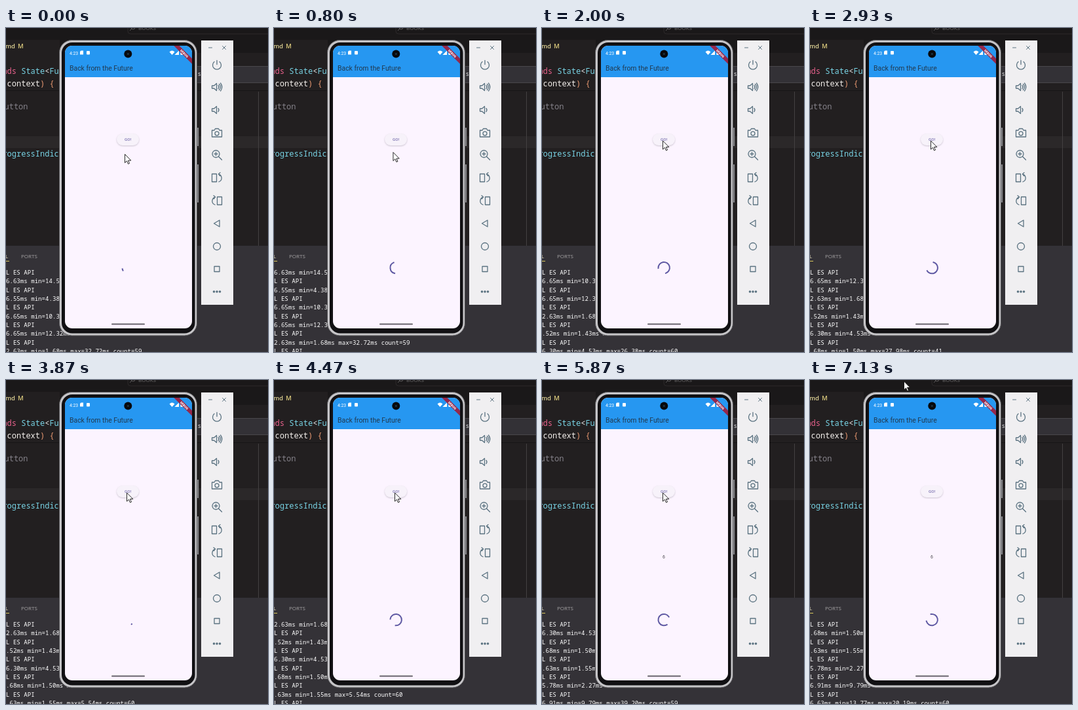
These frames come from a looping animation (400 px wide and 494 px high, 7.2 s). An HTML page:

```html
<!DOCTYPE html>
<html lang="en">
<head>
<meta charset="utf-8">
<title>Future demo</title>
<style>
  html, body { margin: 0; width: 100%; height: 100%; overflow: hidden; background: #221f20; }
  svg { position: absolute; left: 0; top: 0; display: block; }
  text { white-space: pre; }
  .mono { font-family: "Noto Sans Mono", "DejaVu Sans Mono", monospace; }
  .code { font-size: 12px; }
  .log { font-size: 9.1px; font-weight: 500; fill: #fff; }
  .ui { font-family: "Open Sans", "Noto Sans", sans-serif; }
  .app { font-family: Roboto, sans-serif; }
  .tools { fill: none; stroke: #5a7280; stroke-width: 1.3; stroke-linecap: round; stroke-linejoin: round; }
  .tools .solid { fill: #5a7280; stroke: none; }
</style>
</head>
<body>
<svg width="400" height="494" viewBox="0 0 400 494">
  <defs>
    <clipPath id="screen"><rect x="90" y="27" width="194" height="431" rx="11"/></clipPath>
    <clipPath id="console"><rect y="364" width="400" height="130"/></clipPath>
    <filter id="soft" x="-20%" y="-40%" width="140%" height="180%"><feGaussianBlur stdDeviation=".8"/></filter>
  </defs>

  <!-- editor -->
  <rect width="400" height="494" fill="#221f20"/>
  <rect width="400" height="38" fill="#1a1819"/>
  <path d="M186 0V5q0 4 4 4H400" fill="none" stroke="#2c292a"/>
  <rect y="18" width="82" height="20" fill="#221f20"/>
  <g fill="none" stroke="#5c595a"><circle cx="194" cy="-1" r="3"/><path d="M192 1l-3 3"/></g>
  <text class="ui" x="202" y="3" font-size="8" fill="#6b696a">BOOKS</text>
  <text class="ui" x="-1" y="30.500" font-size="9.500" font-weight="600" fill="#dfd395">md <tspan x="18" fill="#d8c77a">M</tspan></text>
  <path d="M0 95.500H82M290 95.500H400" stroke="#171516"/>
  <rect y="165" width="400" height="18" fill="#2b2829"/>
  <path d="M385.500 97V332" stroke="#444142"/>
  <rect x="280" y="58.500" width="130" height="25" fill="#333136" stroke="#4a474b"/>
  <g class="mono code">
    <text x="1.600" y="70.300" fill="#e8618c" text-anchor="start"><tspan x="-5.600">nds </tspan><tspan fill="#78d3e4">State</tspan><tspan fill="#eee">&lt;</tspan><tspan fill="#78d3e4">Fu</tspan></text>
    <text x="1.600" y="89.300" fill="#f4f0ec">context<tspan fill="#eb9a72">) {</tspan></text>
    <text x="-2.500" y="124" fill="#85828a">utton</text>
    <text x="-5.600" y="196" fill="#78d3e4">rogressIndic</text>
    <text x="287" y="73" font-size="9" fill="#ddd">ns</text>
  </g>

  <!-- terminal -->
  <rect y="332" width="400" height="162" fill="#343237"/>
  <text class="ui" x="-1" y="351" font-size="8" fill="#e6e1c0">L</text>
  <text class="ui" x="23" y="351" font-size="8" fill="#a5a2a4">PORTS</text>
  <path d="M0 355.500H5" stroke="#d8c65c"/>
  <g id="log" class="mono log" clip-path="url(#console)"></g>

  <!-- phone -->
  <path d="M291 152h3v28h-3zM291 208h3v58h-3z" fill="#8f8f93"/>
  <rect x="81.500" y="18.500" width="210" height="450.500" rx="19" fill="#c6c5c8" stroke="#59585b"/>
  <rect x="85" y="22" width="203.500" height="443.500" rx="16" fill="#111013"/>
  <g clip-path="url(#screen)">
    <rect x="90" y="27" width="194" height="431" fill="#fcf4ff"/>
    <rect x="90" y="27" width="194" height="48" fill="#2697f1"/>
    <g fill="#fff">
      <text class="app" x="97" y="40.500" font-size="6.800">4:23</text>
      <path d="M113 36l1.500-1.500h3.500v6h-5z"/>
      <rect x="123" y="35" width="5" height="5.500" rx="1"/>
      <path d="M249.500 36.500q4-4 8 0l-4 4.500zM264 34.500v6.500h-6.500zM266.500 35h1v-1h2v1h1v6h-4z"/>
    </g>
    <path d="M258 24.600l28.400 28.400" stroke="#95284c" stroke-width="5.900"/>
    <text class="app" transform="translate(270.900 40.100) rotate(45)" text-anchor="middle" font-size="4.800" font-weight="900" fill="#fff">DEBUG</text>
    <text class="app" x="97" y="65.200" font-size="10.400" fill="#223a50">Back from the Future</text>
    <rect x="169" y="162" width="34" height="18" rx="9" fill="#8b8391" opacity=".42" filter="url(#soft)"/>
    <rect x="169" y="161" width="34" height="18" rx="9" fill="#f7f2fa"/>
    <text class="app" x="186" y="172.100" text-anchor="middle" font-size="6.200" font-weight="500" fill="#7a70b0">GO!</text>
    <text id="result" class="app" x="186" y="271.700" text-anchor="middle" font-size="6.800" fill="#4a464f">6</text>
    <path id="spin" fill="none" stroke="#5f59a3" stroke-width="2" stroke-linecap="square"/>
    <rect x="161" y="450.500" width="51" height="2" rx="1" fill="#67636a"/>
  </g>
  <circle cx="186.300" cy="39.500" r="6" fill="#08090c"/>
  <circle cx="186.300" cy="39.500" r="1.600" fill="#1d3342"/>

  <!-- emulator tools -->
  <rect x="298" y="19" width="49" height="403" fill="#f0eff1"/>
  <g class="tools">
    <path d="M309.500 30h5M330.500 27.500l5 5m0-5l-5 5" stroke-width="1"/>
    <path d="M322 49.500v6M318 51.500a6.500 6.500 0 1 0 8 0"/>
    <path id="speaker" d="M314.500 88h3l4-3.500v11l-4-3.500h-3zM324 87.500q2 2.500 0 5"/>
    <path d="M325.500 85.500q4 4.500 0 9M327.500 84q4.500 6 0 12"/>
    <use href="#speaker" y="35"/>
    <path d="M314.500 156h3.500l1.500-2.500h5l1.500 2.500h3.500v10h-15z"/><circle cx="322" cy="160.800" r="3"/>
    <circle cx="320.500" cy="192" r="5.500"/><path d="M324.500 196l5 5M318 192h5M320.500 189.500v5"/>
    <g id="rotate">
      <path d="M314.500 222.500h7v12h-7zM325 234.500q5-2 4-7-1-4-4.500-4.500M327 220.500l-2.500 2 2 3"/>
    </g>
    <use href="#rotate" transform="translate(644 35) scale(-1 1)"/>
    <path d="M326 293v10l-8.500-5zM318 363.500h8v8h-8z"/>
    <circle cx="322" cy="333" r="5.500"/>
    <g class="solid"><circle cx="317.500" cy="402" r="1.800"/><circle cx="322" cy="402" r="1.800"/><circle cx="326.500" cy="402" r="1.800"/></g>
  </g>

  <path id="cursor" d="M0 0V13l3-2.800 2 4.600 2-.9-2-4.400h4.300z" fill="#fff" stroke="#111" stroke-width=".9"/>
</svg>
<script>
const LOOP = 7200, STEP = 200 / 3;
const $ = id => document.getElementById(id);
const log = $('log'), spin = $('spin'), cursor = $('cursor'), result = $('result');

const stats = [
  '6.63ms min=14.51ms max=20.40ms count=60',
  '6.55ms min=4.38ms max=29.12ms count=60',
  '6.65ms min=10.34ms max=22.75ms count=60',
  '6.65ms min=12.32ms max=20.22ms count=61',
  '2.63ms min=1.68ms max=32.72ms count=59',
  '.52ms min=1.43ms max=4.50ms count=60',
  '6.30ms min=4.53ms max=26.38ms count=60',
  '.68ms min=1.50ms max=27.98ms count=41',
  '.63ms min=1.55ms max=5.54ms count=60',
  '5.78ms min=2.27ms max=34.74ms count=58',
  '6.91ms min=9.79ms max=39.20ms count=59',
  '6.63ms min=13.77ms max=20.19ms count=60'
];
const lines = stats.flatMap(s => ['L ES API', s]);
const ROWS = 10;
const rows = Array.from({ length: ROWS }, (_, i) => {
  const row = document.createElementNS('http://www.w3.org/2000/svg', 'text');
  row.setAttribute('x', 0);
  row.setAttribute('y', 376 + i * 13.35);
  return log.appendChild(row);
});

// Two messages arrive once a second, each pushing the log up a row.
function drawLog(t) {
  const arrived = first => Math.max(0, Math.floor((t - first) / 1000) + 1);
  const top = arrived(460) + arrived(840);
  rows.forEach((row, i) => { row.textContent = lines[top + i] || ''; });
}

const clamp = x => Math.min(1, Math.max(0, x));
const smooth = x => x * x * (3 - 2 * x);

// cubic-bezier(.4, 0, .2, 1)
function ease(x) {
  if (x <= 0 || x >= 1) return clamp(x);
  let lo = 0, hi = 1, u;
  for (let i = 0; i < 24; i++) {
    u = (lo + hi) / 2;
    const bx = 1.2 * u * (1 - u) ** 2 + 0.6 * u * u * (1 - u) + u ** 3;
    if (bx < x) lo = u; else hi = u;
  }
  return 3 * u * u * (1 - u) + u ** 3;
}

// Material indeterminate ring: 1333 ms sweep on a 2222 ms rotation.
function drawSpinner(t) {
  const phase = (t / 1333 + 0.07) % 1;
  const head = ease(phase * 2), tail = ease(phase * 2 - 1);
  const start = -90 + 270 * tail + 90 * phase + 360 * t / 2222 - 124;
  const sweep = Math.max(270 * (head - tail), 0.5);
  const point = deg => {
    const a = deg * Math.PI / 180;
    return (186.2 + 8.7 * Math.cos(a)).toFixed(3) + ' ' + (365.6 + 8.7 * Math.sin(a)).toFixed(3);
  };
  spin.setAttribute('d', `M${point(start)}A8.7 8.7 0 ${+(sweep > 180)} 1 ${point(start + sweep)}`);
}

// time, x, y
const path = [[0, 181.5, 192.5], [600, 181.5, 192.5], [1430, 184.5, 172],
  [6000, 184.5, 172], [6600, 143.5, 2], [LOOP, 143.5, 2]];

function drawCursor(t) {
  const i = path.findIndex(p => p[0] > t);
  const [t0, x0, y0] = path[i - 1], [t1, x1, y1] = path[i];
  const k = smooth((t - t0) / (t1 - t0));
  cursor.setAttribute('transform', `translate(${x0 + (x1 - x0) * k} ${y0 + (y1 - y0) * k})`);
}

const origin = performance.now();
function draw() {
  const now = Math.max(0, performance.now() - origin) % LOOP;
  const t = Math.floor((now + 4) / STEP) * STEP % LOOP;
  drawLog(t);
  drawSpinner(t);
  drawCursor(t);
  result.style.visibility = t >= 5400 ? 'visible' : 'hidden';
  requestAnimationFrame(draw);
}
draw();
</script>
</body>
</html>
```
